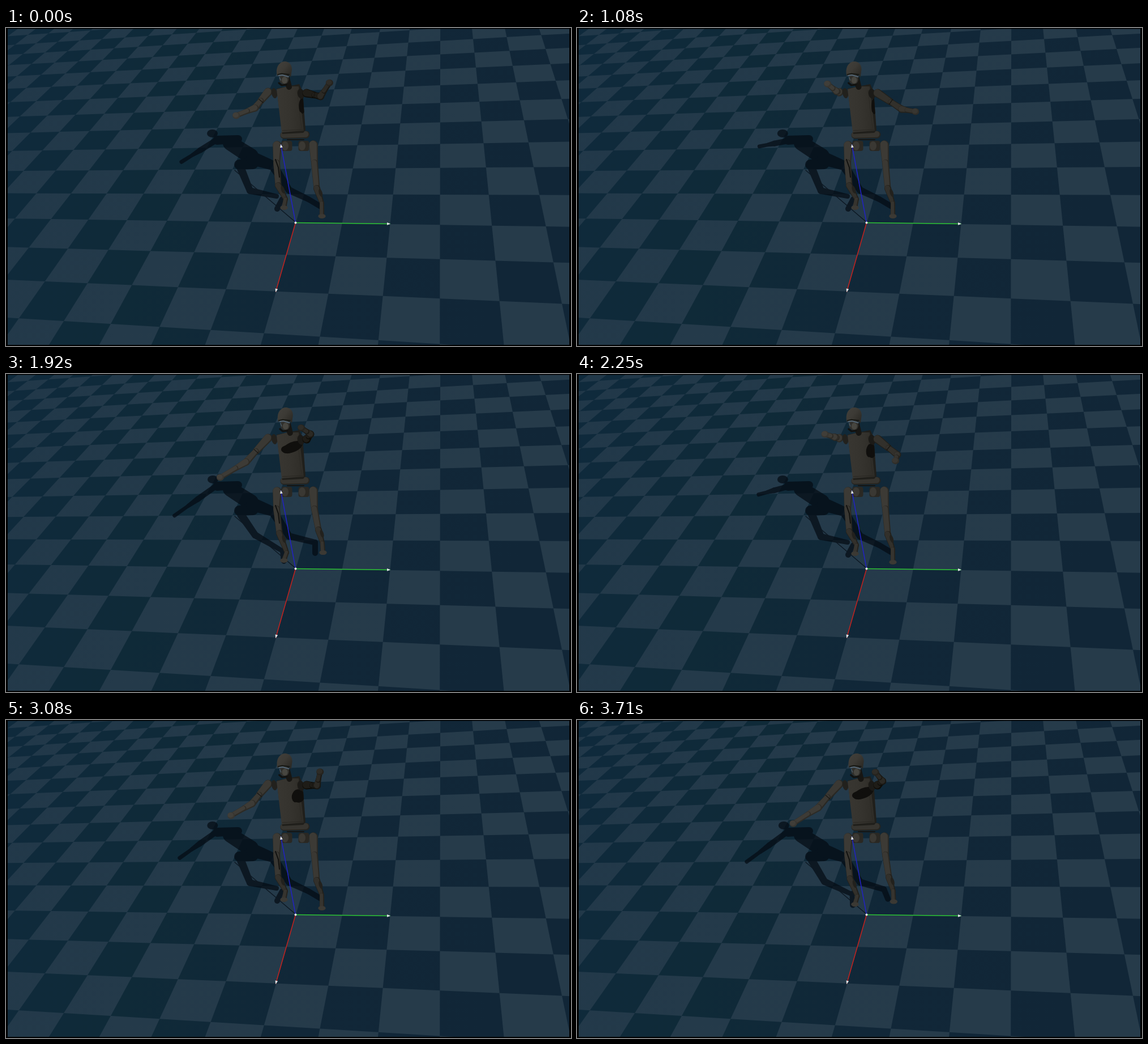
Write an HTML page with a canvas that moves like this. It is 998 by 561 pixels and loops after 3.75 s.

```html
<!DOCTYPE html>
<html lang="en">
<head>
<meta charset="utf-8">
<title>Walking robot</title>
<style>
html, body { margin: 0; width: 100%; height: 100%; overflow: hidden; background: #000; }
canvas { display: block; }
</style>
</head>
<body>
<canvas id="stage" width="998" height="561"></canvas>
<script>
const W = 998, H = 561, LOOP = 3750, STEP = 1000 / 24, STRIDE = 612;
const TAU = Math.PI * 2;
let g = document.getElementById('stage').getContext('2d');

const mix = (a, b, k) => a + (b - a) * k;
const mixPoint = (p, q, k) => [mix(p[0], q[0], k), mix(p[1], q[1], k)];
const clamp = v => Math.max(0, Math.min(1, v));
const gray = v => `rgb(${v},${v - 2},${v - 7})`;

// Each joint swings on a sine wave, bent by a weaker second harmonic.
function poseAt(time) {
  const hurry = 32 * Math.max(0, Math.cos(TAU * (time - 630) / 3080)) ** 3;
  const a = TAU * (time + hurry) / STRIDE;
  const wave = (mean, sin, cos, sin2 = 0, cos2 = 0) => mean + sin * Math.sin(a) +
    cos * Math.cos(a) + sin2 * Math.sin(2 * a) + cos2 * Math.cos(2 * a);
  return {
    rElbow: [wave(438, -20.5, 2), wave(129, 18, 12, 5)],
    rHand: [wave(405, -38, 2), wave(124, 23.5, 30, 21)],
    lElbow: [wave(554, -18, 2, -4), wave(123, -21, -2)],
    lHand: [wave(550, -38.5, 22, -15), wave(132, -12.7, -29, -8.5, -6)],
    headX: wave(491, 2.5, 0),
    step: clamp(.5 + 2.5 * Math.sin(a - TAU * .1))
  };
}

function poly(points, color) {
  g.fillStyle = color;
  g.beginPath();
  points.forEach(p => g.lineTo(p[0], p[1]));
  g.closePath();
  g.fill();
}

function oval(x, y, rx, ry, color, turn = 0) {
  g.fillStyle = color;
  g.beginPath();
  g.ellipse(x, y, rx, ry, turn, 0, TAU);
  g.fill();
}

function line(points, width, color) {
  g.strokeStyle = color;
  g.lineWidth = width;
  g.lineCap = g.lineJoin = 'round';
  g.beginPath();
  points.forEach(p => g.lineTo(p[0], p[1]));
  g.stroke();
}

// Tapered round-ended segment
function taper(p, r1, q, r2, color) {
  const a = Math.atan2(q[1] - p[1], q[0] - p[0]);
  g.fillStyle = color;
  g.beginPath();
  g.arc(p[0], p[1], r1, a + Math.PI / 2, a - Math.PI / 2);
  g.arc(q[0], q[1], r2, a - Math.PI / 2, a + Math.PI / 2);
  g.fill();
}

function limb(p, r1, q, r2, tone) {
  taper(p, r1, q, r2, gray(tone - 16));
  taper([p[0] - .8, p[1] - .6], r1 - 1.2, [q[0] - .8, q[1] - .6], r2 - 1.2, gray(tone));
}

function gradient(x1, y1, x2, y2, colors) {
  const fill = g.createLinearGradient(x1, y1, x2, y2);
  colors.forEach((c, i) => fill.addColorStop(i / (colors.length - 1), c));
  return fill;
}

// Perspective view of the ground plane
function floorPoint(u, v) {
  const w = 1 - .0186 * u - .06 * v;
  return [(512 + 70.6 * u - 46.08 * v) / w, (343.5 - 5.2 * u + 32.7 * v) / w];
}

function onLayer(paint) {
  const layer = document.createElement('canvas');
  layer.width = W;
  layer.height = H;
  const screen = g;
  g = layer.getContext('2d');
  paint();
  g = screen;
  return layer;
}

function paintFloor() {
  g.fillStyle = gradient(0, 100, 900, 360, ['#0f2a3c', '#0f2a38', '#112738', '#112637']);
  g.fillRect(0, 0, W, H);
  const light = gradient(0, 60, 700, 400, ['#213849', '#243a4a', '#263b4a']);
  for (let u = -19; u < 9; u++)
    for (let v = -16; v < 5; v++)
      if ((u + v) % 2 === 0)
        poly([[u, v], [u + 1, v], [u + 1, v + 1], [u, v + 1]].map(p => floorPoint(...p)), light);
  g.strokeStyle = '#000';
  g.lineWidth = 3;
  g.strokeRect(1.5, 0, W - 3, H - .5);
}

function paintShadow({ rHand, headX, step }) {
  const ink = '#040b14';
  const part = (p, r1, q, r2) => taper(p, r1, q, r2, ink);
  const dx = rHand[0] - 407, dy = rHand[1] - 154;
  const hand = [310 + .577 * dx + .149 * dy, 236 + .028 * dx + .51 * dy];
  const shoulder = [368, 200];
  const elbow = mixPoint(shoulder, hand, .42);

  oval(364 + (headX - 490) * .5, 186, 9.5, 7, ink);
  part(shoulder, 5, elbow, 5);
  part(elbow, 5, mixPoint(elbow, hand, .4), 3.5);
  part(elbow, 3, hand, 3.5);
  part([373, 198], 8, [410, 196], 7);
  part([396, 203], 13, [432, 226], 14);
  part([412, 241], 9, [436, 239], 10);
  part([436, 230], 12, [467, 241], 9);

  const rKnee = mixPoint([431, 287], [440, 284], step);
  const rAnkle = mixPoint([478, 297], [488, 312], step);
  part([415, 248], 7, rKnee, 6);
  part(rKnee, 6, rAnkle, 4);
  part(mixPoint([487, 302], rAnkle, step), 4, mixPoint([479, 319], [491, 330], step), 5);
  const lKnee = [500, 286], lAnkle = mixPoint([534, 302], [546, 297], step);
  part([473, 245], 8, lKnee, 6);
  part(lKnee, 6, lAnkle, 5);
  part(lAnkle, 5, mixPoint([556, 315], [546, 316], step), 5);
  line([[404, 251], [512, 343]], 1.5, ink);
}

function drawLeg(hip, middle, knee, ankle, foot) {
  limb(hip, 7.8, middle, 6, 60);
  limb(middle, 6, knee, 5.5, 58);
  limb(knee, 6, ankle, 4, 50);
  const shin = mixPoint(knee, ankle, .3);
  oval(shin[0] + 4, shin[1], 3, 7, '#22211d', -.3);
  limb(ankle, 4, foot, 4.2, 54);
  oval(foot[0], foot[1], 6.7, 4, gray(59));
}

function drawLegs(step) {
  const between = (down, up) => mixPoint(down, up, step);
  drawLeg([479, 207], [478, 238], between([481, 278], [483, 281]),
    between([494, 302], [496, 315]), between([491, 317], [491, 329]));
  line([[476, 232], [481, 246], [483, 263]], 2, '#11110f');
  drawLeg([543, 206], [545, 238], between([549, 283], [552, 275]),
    between([558, 309], [559, 298]), between([558, 332], [560, 315]));
}

function drawTorso({ lHand }) {
  for (const x of [496, 526]) {
    g.fillStyle = gray(42);
    g.beginPath();
    g.roundRect(x - 9.5, 199, 19, 18, 4);
    g.fill();
    oval(x - 3, 208, 6, 8, gray(58));
  }
  limb([491, 189], 6.5, [530, 188], 6.5, 54);
  line([[497, 197], [526, 197]], 2, '#161512');

  const outline = [[478, 107], [518, 99], [524, 112], [529, 180], [525, 185], [488, 187]];
  poly(outline, '#201f1b');
  poly([[478, 108], [497, 103], [517, 103], [526, 181], [487, 184]],
    gradient(480, 0, 526, 0, [gray(56), gray(53), gray(46)]));
  line([[488, 181], [525, 179]], 1, '#292722');
  line([[514, 110], [522, 176]], 1, '#2c2a25');

  // Shadow that the left arm casts on the chest
  const cover = clamp((575 - lHand[0]) / 45);
  const x = mix(524, 505, cover), rx = mix(4, 19, cover), ry = mix(14, 9, cover);
  g.save();
  g.beginPath();
  outline.forEach(p => g.lineTo(p[0], p[1]));
  g.clip();
  oval(x + 1, mix(138, 129, cover), rx, ry, '#100f0d', -.4 * cover);
  oval(x - rx * .4, mix(138, 133, cover), rx * .6, ry * .8, '#100f0d');
  g.restore();
}

function drawHead(x) {
  taper([x + 4, 88], 6, [x + 9, 104], 5, '#171613');
  oval(x, 90, 8.5, 9.5, '#302f2b', -.15);
  oval(x + 1, 92, 5, 6, '#474640');
  line([[x - 9, 97], [x - 4, 101], [x + 4, 100]], 3, '#11110f');
  g.fillStyle = gradient(x - 14, 60, x + 14, 82, [gray(66), gray(60), gray(42)]);
  g.beginPath();
  g.moveTo(x - 13, 80);
  g.bezierCurveTo(x - 15, 54, x + 14, 53, x + 14, 73);
  g.lineTo(x + 12, 87);
  g.quadraticCurveTo(x + 9, 79, x - 12, 84);
  g.fill();
  line([[x - 11, 82], [x - 4, 80.5], [x + 9, 82]], 1.7, '#11130f');
  line([[x - 9, 84], [x - 3, 83], [x + 8, 86]], 2, '#526473');
  line([[x - 8, 87], [x - 6, 92]], 1.5, '#465967');
}

function drawArm(shoulder, elbow, hand, upperTone, foreTone) {
  const upper = mixPoint(shoulder, elbow, .55);
  limb(shoulder, 7.5, upper, 6, upperTone);
  limb(upper, 5.2, elbow, 6.3, upperTone);
  const across = Math.atan2(elbow[1] - shoulder[1], elbow[0] - shoulder[0]) + Math.PI / 2;
  const dx = Math.cos(across) * 5, dy = Math.sin(across) * 5;
  line([[upper[0] - dx, upper[1] - dy], [upper[0] + dx, upper[1] + dy]], 1.2, '#171613');
  limb(elbow, 6.3, mixPoint(elbow, hand, .5), 4.5, foreTone);
  limb(mixPoint(elbow, hand, .4), 4.6, hand, 4.5, foreTone);
  oval(hand[0], hand[1], 6.5, 6, gray(foreTone - 6));
  oval(hand[0] - 1, hand[1] - 1, 5.2, 4.6, gray(foreTone + 3));
}

function arrow(tip, color) {
  const base = [511.5, 343.5];
  const a = Math.atan2(tip[1] - base[1], tip[0] - base[0]);
  line([base, tip], 1.5, color);
  const at = (along, side) => [
    tip[0] + Math.cos(a) * along - Math.sin(a) * side,
    tip[1] + Math.sin(a) * along + Math.cos(a) * side];
  poly([at(1, 0), at(-5, 2.4), at(-5, -2.4)], '#dfe4e6');
}

const floor = onLayer(paintFloor);
const shade = onLayer(() => {});
const shadeContext = shade.getContext('2d');

function drawShadow(pose) {
  // Solid parts merge first so that overlaps do not darken twice.
  const screen = g;
  g = shadeContext;
  g.clearRect(0, 0, W, H);
  paintShadow(pose);
  g = screen;
  g.globalAlpha = .72;
  g.drawImage(shade, 0, 0);
  g.globalAlpha = 1;
}

function draw(time) {
  const pose = poseAt(time);
  g.drawImage(floor, 0, 0);
  drawShadow(pose);
  drawLegs(pose.step);
  drawArm([463, 113], pose.rElbow, pose.rHand, 58, 61);
  oval(474, 115, 5, 9, '#22211d', -.2);
  drawTorso(pose);
  drawHead(pose.headX);
  const lit = clamp((pose.lHand[1] - 95) / 40);
  oval(521, 116, 6, 9, '#1b1a17', -.2);
  drawArm([531, 115], pose.lElbow, pose.lHand, mix(30, 50, lit), mix(43, 53, lit));

  arrow([485.5, 206], '#2222c4');
  arrow([678, 345.5], '#2cc334');
  arrow([476.5, 465], '#c4221f');
  oval(511.5, 343.5, 2, 2, '#e6e9ea');
}

const start = performance.now();
function tick() {
  const time = (performance.now() - start) % LOOP;
  draw(Math.min(89, Math.floor((time + 5) / STEP)) * STEP);
  requestAnimationFrame(tick);
}
tick();
</script>
</body>
</html>
```
